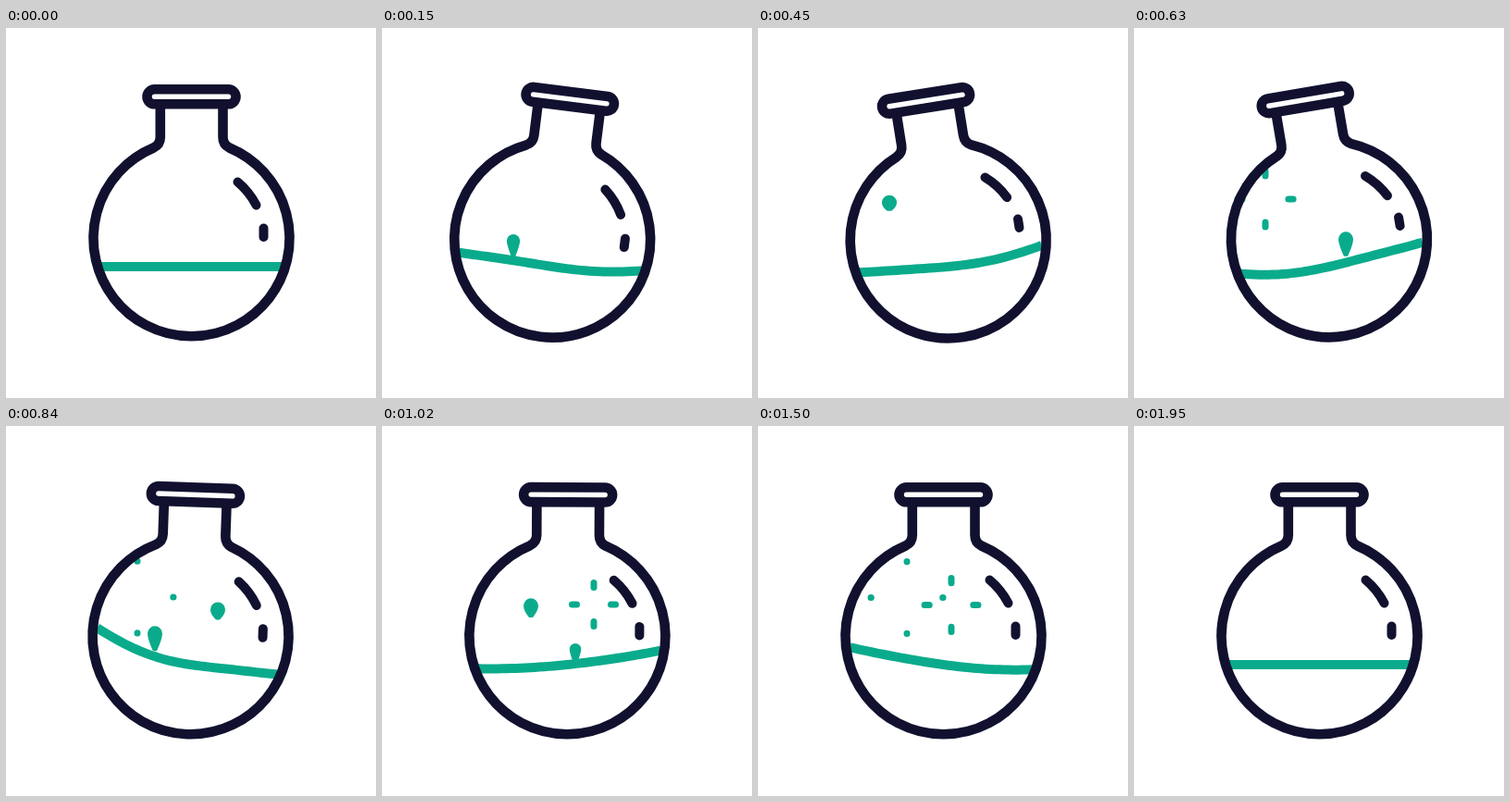
Animation of 400 by 400 pixels, one loop 2.04 s. Source, as an HTML page:

```html
<!DOCTYPE html>
<html lang="en">
<head>
<meta charset="utf-8">
<title>Flask</title>
<style>
  html, body { margin: 0; width: 100%; height: 100%; overflow: hidden; background: #fff; }
  svg { display: block; width: 100%; height: 100%; }
</style>
</head>
<body>
<svg viewBox="0 0 400 400">
  <path id="liquid" fill="none" stroke="#0aab8c" stroke-width="10"/>
  <path id="drops" fill="#0aab8c"/>
  <path id="sparks" fill="none" stroke="#0aab8c" stroke-width="7" stroke-linecap="round"/>
  <g id="flask" fill="none" stroke="#11112f" stroke-width="10.6" stroke-linecap="round" stroke-linejoin="round">
    <rect x="152.5" y="66.3" width="96" height="16" rx="8"/>
    <path d="M166.8 84V118Q166.8 126 159.5 129.5A106 106 0 1 0 241.5 129.5Q234.5 126 234.5 118V84"/>
    <path stroke-width="10" d="M250.5 166.5Q263 177 270.5 191.5M278.5 216.5V226"/>
  </g>
</svg>
<script>
const LOOP = 2040, STEP = 30;
const { PI, sin, cos, abs, min, max } = Math;
const [liquid, drops, sparks, flask] =
  ['liquid', 'drops', 'sparks', 'flask'].map(id => document.getElementById(id));

const clamp = v => max(0, min(1, v));
const easeOut = p => 1 - (1 - clamp(p)) ** 2;
const easeInOut = p => (1 - cos(PI * clamp(p))) / 2;

// eased swing through [time, value] turning points, starting from rest
function swing(t, points) {
  let from = 0, value = 0;
  for (const [to, goal] of points) {
    value += (goal - value) * easeInOut((t - from) / (to - from));
    from = to;
  }
  return value;
}

// the surface rocks as a fading wave, u runs from -1 to 1 across the flask
function surface(t) {
  const fade = clamp(t / 200) * clamp((1950 - t) / 350);
  const rock = (33 - .009 * t) * cos(2 * PI * (t - 256) / 580) * fade;
  const ripple = 3.5 * cos(2 * PI * (t - 280) / 1000) * fade;
  return u => 258 + rock * u - .565 * abs(rock) * u * u + ripple * sin(PI * u);
}

// x, y of the burst and start delay
const BUBBLES = [[142, 185, 0], [161, 185.5, 665], [229, 193, 440], [209, 193.5, 880]];

function dropPath(x, y, t) {
  if (t < 70 || t > 490) return '';
  const q = 1 - clamp((t - 70) / 400);
  const s = min(clamp((t - 70) / 90), clamp((490 - t) / 35));
  const r = 8 * s, tail = (8.5 + 14 * q) * s;
  return `M${x - r} ${y + 3.5 + 65 * q * q}a${r} ${r} 0 0 1 ${2 * r} 0` +
    `c0 ${5 * s} ${-4 * s} ${tail * .8} ${-6 * s} ${tail}h${-4 * s}` +
    `c${-2 * s} ${-tail * .2} ${-6 * s} ${5 * s - tail} ${-6 * s} ${-tail}z`;
}

function sparkPath(x, y, t) {
  if (t < 470 || t > 870) return '';
  const head = 39 * easeOut((t - 459) / 327), tail = 39 * easeOut((t - 470) / 400) - .01;
  return [[1, 0], [-1, 0], [0, 1], [0, -1]].map(([u, v]) =>
    `M${x + u * tail} ${y + v * tail}L${x + u * head} ${y + v * head}`).join('');
}

function draw(t) {
  const tilt = swing(t, [[300, 14.3], [510, -14.5], [840, 2], [1080, 0]]);
  const dx = swing(t, [[270, -22], [540, 8.5], [780, 0]]);
  const dy = 2.7 * sin(PI * clamp(t / 780));
  flask.setAttribute('transform', `translate(${dx} ${dy}) rotate(${tilt} 200 200)`);

  const cx = 200.5 + dx - 27 * sin(tilt * PI / 180);
  const height = surface(t);
  const line = Array.from({ length: 41 }, (_, i) => i / 20 - 1)
    .map(u => `${cx + 101 * u} ${height(u)}`);
  liquid.setAttribute('d', 'M' + line.join('L'));

  const all = make => BUBBLES.map(([x, y, delay]) => make(x, y, t - delay)).join('');
  drops.setAttribute('d', all(dropPath));
  sparks.setAttribute('d', all(sparkPath));
}

const start = performance.now();
function frame() {
  const t = (performance.now() - start) % LOOP;
  draw(Math.floor(t / STEP) * STEP);
  requestAnimationFrame(frame);
}
frame();
</script>
</body>
</html>
```
